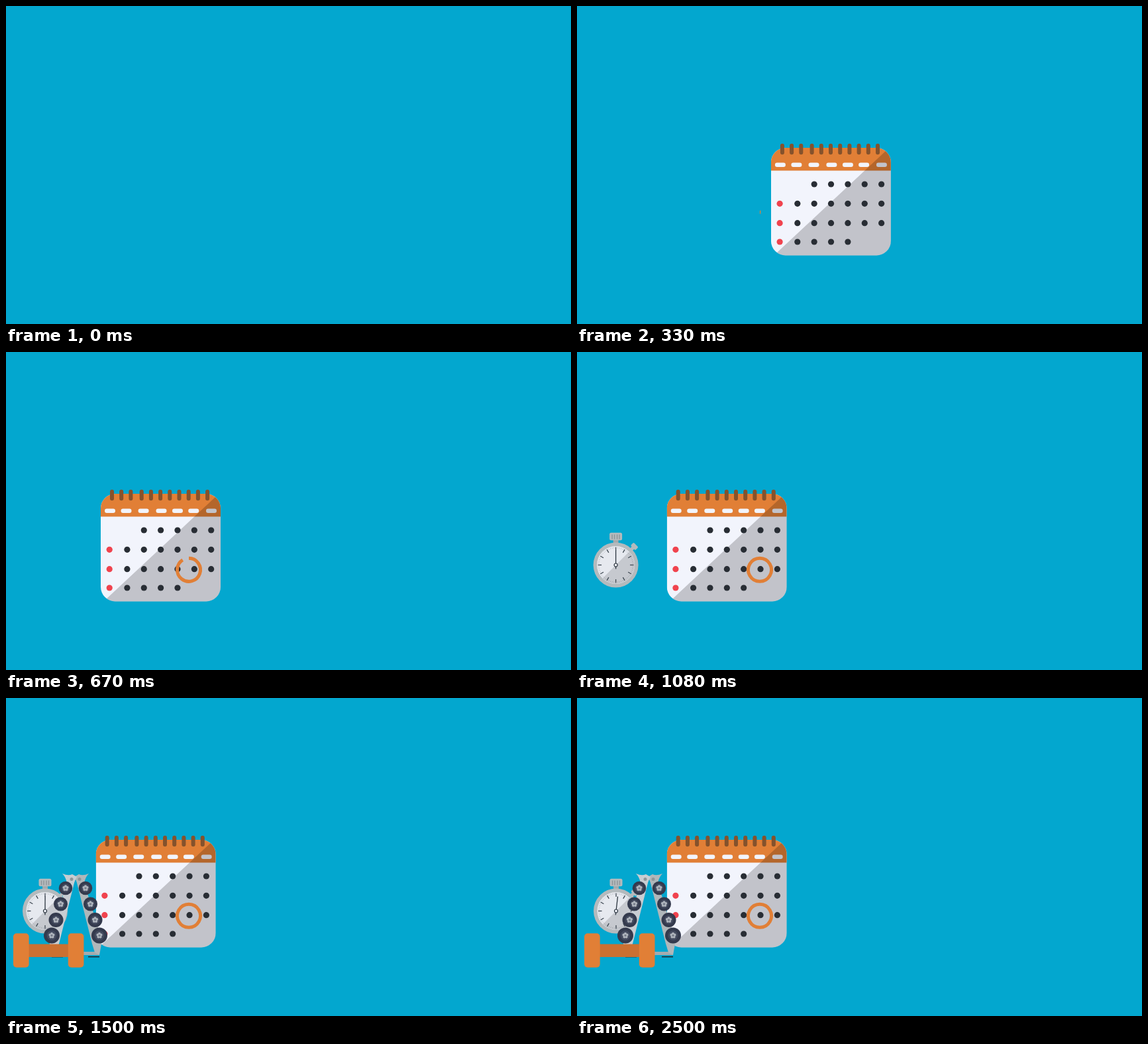
An HTML page that plays this animation: 853 px wide and 480 px high, repeating every 2580 ms.

```html
<!DOCTYPE html>
<html lang="en">
<head>
<meta charset="utf-8">
<title>Workout schedule</title>
<style>
  html, body { margin: 0; width: 100%; height: 100%; overflow: hidden; background: #03a7cf; }
  svg { display: block; width: 100vw; height: 100vh; }
</style>
</head>
<body>
<svg viewBox="0 0 853 480" preserveAspectRatio="xMidYMid meet">
  <defs>
    <clipPath id="card"><rect y="214" width="181" height="162.5" rx="22"/></clipPath>
    <clipPath id="face"><circle r="28.5"/></clipPath>
  </defs>
  <rect width="853" height="480" fill="#03a7cf"/>

  <g id="calendar">
    <g clip-path="url(#card)">
      <rect y="214" width="181" height="163" fill="#f2f4fc"/>
      <rect y="214" width="181" height="34.5" fill="#e17f36"/>
      <g id="dashes" fill="#f2f4fc"></g>
      <path d="M-1 381.5 181 211.5V380H-1Z" fill="#000" fill-opacity=".2"/>
    </g>
    <g id="dots"></g>
    <g id="rings" fill="#85522c"></g>
  </g>

  <path id="mark" fill="none" stroke="#e17f36" stroke-width="5"/>

  <g id="watch">
    <g transform="translate(59 321.5)">
      <g transform="rotate(45)" fill="#b4babd">
        <rect x="-2.5" y="-38" width="5" height="6"/>
        <rect x="-5" y="-43" width="10" height="6.5" rx="1.5"/>
      </g>
      <rect x="-4" y="-38" width="8" height="6" fill="#a4aaad"/>
      <rect x="-9.5" y="-48.7" width="19" height="11.5" rx="2.5" fill="#b4babd"/>
      <path d="M-5.5-46v7M-2-46v7M2-46v7M5.5-46v7" stroke="#8c9295" stroke-width="1.3"/>
      <circle r="34" fill="#b4babd"/>
      <circle r="28.5" fill="#e6e9ef"/>
      <path d="M-30 30 30-30V30Z" fill="#c6c9cf" clip-path="url(#face)"/>
      <g id="ticks" stroke="#3e4852"></g>
      <path id="hand" d="M0 6V-22" stroke="#2c3640" stroke-width="1.3"/>
      <circle r="2.5" fill="#f2f4fc" stroke="#2c3640" stroke-width="1.2"/>
    </g>
  </g>

  <g id="grip"></g>

  <g id="dumbbell" fill="#e17f36">
    <rect x="32" y="371.5" width="64" height="19.5" fill="#cb7031"/>
    <rect x="11" y="355.3" width="23.7" height="51.5" rx="5"/>
    <rect x="93.8" y="355.3" width="23.7" height="51.5" rx="5"/>
  </g>
</svg>

<script>
const LOOP = 2580, FPS = 12;
const $ = id => document.getElementById(id);

function add(parent, tag, attrs) {
  const el = document.createElementNS('http://www.w3.org/2000/svg', tag);
  for (const name in attrs) el.setAttribute(name, attrs[name]);
  return parent.appendChild(el);
}

function buildCalendar() {
  for (const x of [14, 38.5, 64.6, 91.5, 116, 140.2, 167])
    add($('dashes'), 'rect', { x: x - 8, y: 236.5, width: 16, height: 6.5, rx: 3.2 });

  const rows = [[269, 2, 6], [298.3, 0, 6], [327.7, 0, 6], [356, 0, 4]];
  for (const [cy, first, last] of rows)
    for (let c = first; c <= last; c++)
      add($('dots'), 'circle', {
        cx: c ? 39.9 + 25.36 * (c - 1) : 13.2, cy, r: 4.6,
        fill: c ? '#282d34' : '#f0434e'
      });

  for (let i = 0; i < 11; i++)
    add($('rings'), 'rect', {
      x: 14 + 14.2 * i + (i > 2 ? 2.1 : 0), y: 207.7, width: 6, height: 16.5, rx: 3
    });
}

function buildWatch() {
  for (let i = 0; i < 60; i++) {
    const main = i % 5 === 0;
    add($('ticks'), 'path', {
      d: main ? 'M0-27V-21.5' : 'M0-27V-25',
      transform: `rotate(${i * 6})`,
      'stroke-width': main ? 1.3 : 0.6,
      'stroke-opacity': main ? 1 : 0.35
    });
  }
}

function roller(parent, x, y, r) {
  const g = add(parent, 'g', { transform: `translate(${x} ${y})` });
  add(g, 'circle', { r, fill: '#343a4d' });
  add(g, 'circle', { r: r * 0.62, fill: '#444b5f' });
  for (let i = 0; i < 5; i++)
    add(g, 'circle', { cy: -2.7, r: 2, fill: '#aeb4bc', transform: `rotate(${i * 72})` });
  add(g, 'circle', { r: 1.6, fill: '#737a88' });
}

// One arm of the hand grip, drawn to the left of its axis x = 0.
function gripArm(parent, flip, light, dark) {
  const g = add(parent, 'g', { transform: `translate(109 0) scale(${flip} 1)` });
  add(g, 'path', { d: 'M-36 383H-8V388H-36Z', fill: dark });
  add(g, 'path', { d: 'M-36 390.6H-19', stroke: '#20262c', 'stroke-width': 1.6 });
  add(g, 'path', { d: 'M-12 276 0 271-25 371-29 384-36 388-40 366Z', fill: light });
  add(g, 'path', { d: 'M-20 265Q-11 269-5 266L2 270-3 280-13 279Q-15 270-20 265Z', fill: light });
  add(g, 'circle', { cx: -6, cy: 273.5, r: 2.5, fill: '#8e9598' });
}

function buildGrip() {
  const g = $('grip');
  gripArm(g, -1, '#b0b7ba', '#a4abae');
  gripArm(g, 1, '#c8cdd2', '#a4abae');
  const wheels = [[15, 287, 10.3], [22.5, 311, 10.5], [29.5, 335, 11], [36, 358.5, 12]];
  for (const [dx, y, r] of wheels) {
    roller(g, 109 - dx, y, r);
    roller(g, 109 + dx, y, r);
  }
}

// Distance left to travel after n steps: a steep ease-out.
const GLIDE = [[0, 6.85], [2, 5.545], [4, 4.242], [7, 2.449], [8, 1.765], [10, 0]];
function glide(n) {
  if (n >= 10) return 0;
  n = Math.max(n, 0);
  const i = GLIDE.findIndex(p => p[0] > n);
  const [a, u] = GLIDE[i - 1], [b, v] = GLIDE[i];
  return Math.pow(u + (v - u) * (n - a) / (b - a), 3.5);
}

function drawMark(degrees) {
  const cx = 276, cy = 328.8, r = 17.5;
  const end = Math.min(degrees, 359.99) * Math.PI / 180;
  const x = cx + r * Math.sin(end), y = cy - r * Math.cos(end);
  $('mark').setAttribute('d', degrees <= 0 ? '' :
    `M${cx} ${cy - r}A${r} ${r} 0 ${degrees > 180 ? 1 : 0} 1 ${x} ${y}${degrees >= 360 ? 'Z' : ''}`);
}

const place = (id, x) => $(id).setAttribute('transform', `translate(${x} 0)`);

// Motion advances in steps of a twelfth of a second, on 10 ms marks.
function stepAt(t) {
  let k = Math.floor(t * FPS / 1000 + 0.05);
  while (Math.round(k * 100 / FPS) * 10 > t) k--;
  return k;
}

function render(t) {
  const k = stepAt(t);
  place('calendar', 135.7 + glide(k));
  drawMark((k - 3.95) * 81);
  place('watch', -0.62 * glide(k - 4));
  place('grip', -0.63 * glide(k - 9.92));
  place('dumbbell', -130 * Math.pow(Math.max(0, (18.3 - k) / 4.3), 3));
  $('hand').setAttribute('transform', `rotate(${Math.max(0, k - 17.5) * 0.52})`);
}

buildCalendar();
buildWatch();
buildGrip();

const start = performance.now();
function tick() {
  render((performance.now() - start) % LOOP);
  requestAnimationFrame(tick);
}
render(0);
requestAnimationFrame(tick);
</script>
</body>
</html>
```
